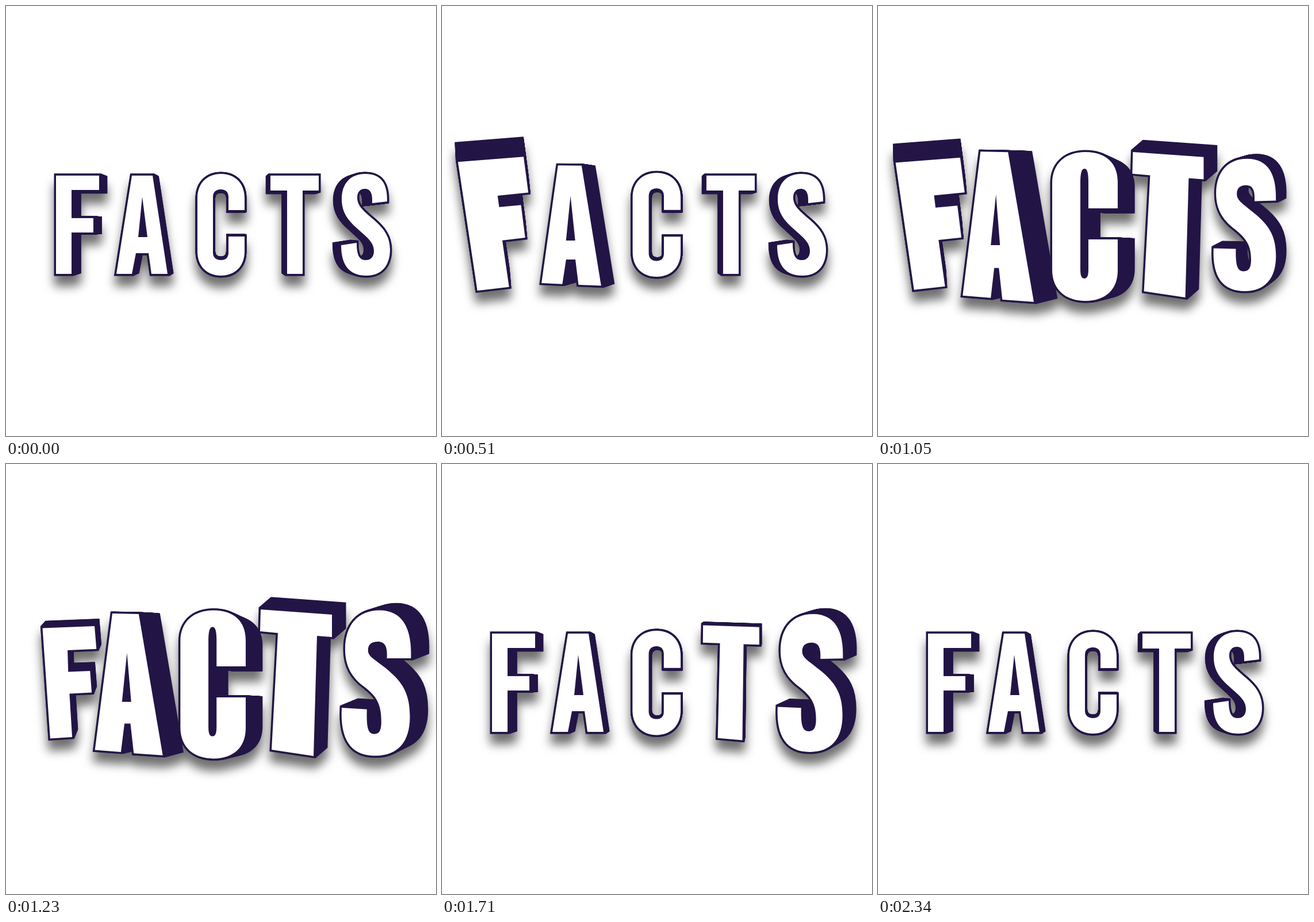
Animation, 748 px wide and 748 px high, one loop 2.37 s. Source, as an HTML page with a canvas:

```html
<!DOCTYPE html>
<html lang="en">
<head>
<meta charset="utf-8">
<title>Facts</title>
<style>
  html, body { margin: 0; width: 100%; height: 100%; overflow: hidden; background: #fff; }
  canvas { display: block; }
</style>
</head>
<body>
<canvas id="stage" width="748" height="748" role="img" aria-label="FACTS"></canvas>
<script>
const SIZE = 748, LOOP = 2370, STEP = 30;
const INK = '#231546', LAYERS = 28;
const START = 50, STAGGER = 158, RISE = 640, HOLD = 110, FALL = 780;

// Each pose: outline, centre, depth offset of the back face and its shrink.
const letters = [
  {
    rest: { d: 'M87,295 L162,295 L162,320 L114,320 L114,369 L152,369 L152,394 L114,394 L114,466 L87,466 Z',
            c: [124, 380], o: [13, 0], k: .05 },
    big:  { d: 'M22,269 L140,259 L149,325 L95,331 L98,348 L136,344 L144,404 L104,409 L117,491 L59,498 Z',
            c: [86, 380], o: [-4, -36], k: .01 }
  },
  {
    rest: { d: 'M219,295 L255,295 L281,466 L253,466 L248,430 L226,430 L219,466 L192,466 Z M237,332 L246,402 L230,402 Z',
            c: [236, 380], o: [9, 0], k: .05 },
    big:  { d: 'M178,253 L226,254 L271,515 L216,511 L210,456 L202,456 L196,508 L147,504 Z M205,328 L212,416 L196,416 Z',
            c: [208, 385], o: [40, -4], k: .04 }
  },
  {
    rest: { d: 'M415,355 L415,334 C415,308 398,292 374,292 C350,292 333,308 333,334 L333,427 C333,453 350,469 374,469 C398,469 415,453 415,427 L415,401 L387,401 L387,429 C387,438 382,442 374,442 C365,442 360,437 360,429 L360,332 C360,324 365,319 374,319 C382,319 387,324 387,332 L387,355 Z',
            c: [374, 380], o: [0, 0], k: .05 },
    big:  { d: 'M417,352 L417,306 C417,273 396,254 361,254 C326,254 303,274 303,308 L303,459 C303,493 326,513 361,513 C396,513 417,493 417,460 L417,406 L366,406 L366,458 C366,469 364,474 359,474 C354,474 352,469 352,458 L352,308 C352,291 354,283 359,283 C364,283 366,290 366,306 L366,352 Z',
            c: [361, 384], o: [31, 3], k: .08 }
  },
  {
    rest: { d: 'M460,295 L544,295 L544,321 L516,321 L516,466 L489,466 L489,321 L460,321 Z',
            c: [502, 380], o: [-7, 0], k: .05 },
    big:  { d: 'M443,253 L567,262 L567,301 L541,299 L535,508 L462,497 L473,294 L442,291 Z',
            c: [505, 380], o: [21, -18], k: 0 }
  },
  {
    rest: { d: 'M663,340 C664,306 650,292 625,292 C600,292 584,308 584,336 C584,360 596,374 612,388 C630,404 640,412 640,426 C640,436 635,442 626,442 C616,442 610,436 610,412 L583,416 C583,452 598,469 627,469 C653,469 668,452 668,424 C668,400 656,386 640,372 C620,355 611,347 611,333 C611,324 616,318 624,318 C633,318 638,324 637,343 Z',
            c: [626, 380], o: [-14, 0], k: .05 },
    big:  { d: 'M705,338 C707,285 690,254 650,254 C612,254 590,280 590,322 C590,352 602,372 624,388 C645,404 653,418 653,448 C653,463 650,470 641,470 C630,470 627,460 628,427 L584,424 C581,480 600,508 643,508 C682,508 703,484 703,440 C703,402 692,382 668,361 C642,339 630,336 630,324 C630,314 636,309 647,309 C660,309 664,318 663,338 Z',
            c: [645, 380], o: [30, -12], k: .02 }
  }
];

const ctx = document.getElementById('stage').getContext('2d');
const buffer = document.createElement('canvas');
buffer.width = buffer.height = SIZE;
const ink = buffer.getContext('2d');
ink.lineWidth = 7;
ink.strokeStyle = INK;
ink.lineJoin = 'miter';

const mix = (a, b, p) => a + (b - a) * p;
const mixPair = (a, b, p) => a.map((v, i) => mix(v, b[i], p));
const clamp = x => Math.max(0, Math.min(1, x));
const ease = x => x < .5 ? 4 * x ** 3 : 1 - 4 * (1 - x) ** 3;

function mixPath(a, b, p) {
  const ends = b.match(/[\d.]+/g);
  let i = 0;
  return new Path2D(a.replace(/[\d.]+/g, v => mix(+v, +ends[i++], p).toFixed(2)));
}

function growth(t, index) {
  const local = t - START - index * STAGGER;
  const top = RISE + HOLD;
  return local < top ? ease(clamp(local / RISE)) : 1 - ease(clamp((local - top) / FALL));
}

function drawLetter({ rest, big }, p) {
  const path = mixPath(rest.d, big.d, p);
  const [cx, cy] = mixPair(rest.c, big.c, p);
  const [ox, oy] = mixPair(rest.o, big.o, p);
  const k = mix(rest.k, big.k, p);
  ink.fillStyle = INK;
  for (let i = LAYERS; i >= 0; i--) {
    const s = i / LAYERS, z = 1 - k * s;
    ink.setTransform(z, 0, 0, z, cx * (1 - z) + ox * s, cy * (1 - z) + oy * s);
    ink.fill(path, 'evenodd');
    ink.stroke(path);
  }
  ink.fillStyle = '#fff';
  ink.fill(path, 'evenodd');
}

function render(t) {
  ink.setTransform(1, 0, 0, 1, 0, 0);
  ink.clearRect(0, 0, SIZE, SIZE);
  letters.forEach((letter, i) => drawLetter(letter, growth(t, i)));

  ctx.shadowColor = 'transparent';
  ctx.fillStyle = '#fff';
  ctx.fillRect(0, 0, SIZE, SIZE);
  ctx.shadowColor = 'rgba(0, 0, 0, .56)';
  ctx.shadowBlur = 17;
  ctx.shadowOffsetY = 18;
  ctx.drawImage(buffer, 0, 0);
}

const begin = performance.now();
let last = -1;
function tick() {
  const t = Math.floor(((performance.now() - begin) % LOOP) / STEP) * STEP;
  if (t !== last) render(last = t);
  requestAnimationFrame(tick);
}
tick();
</script>
</body>
</html>
```
